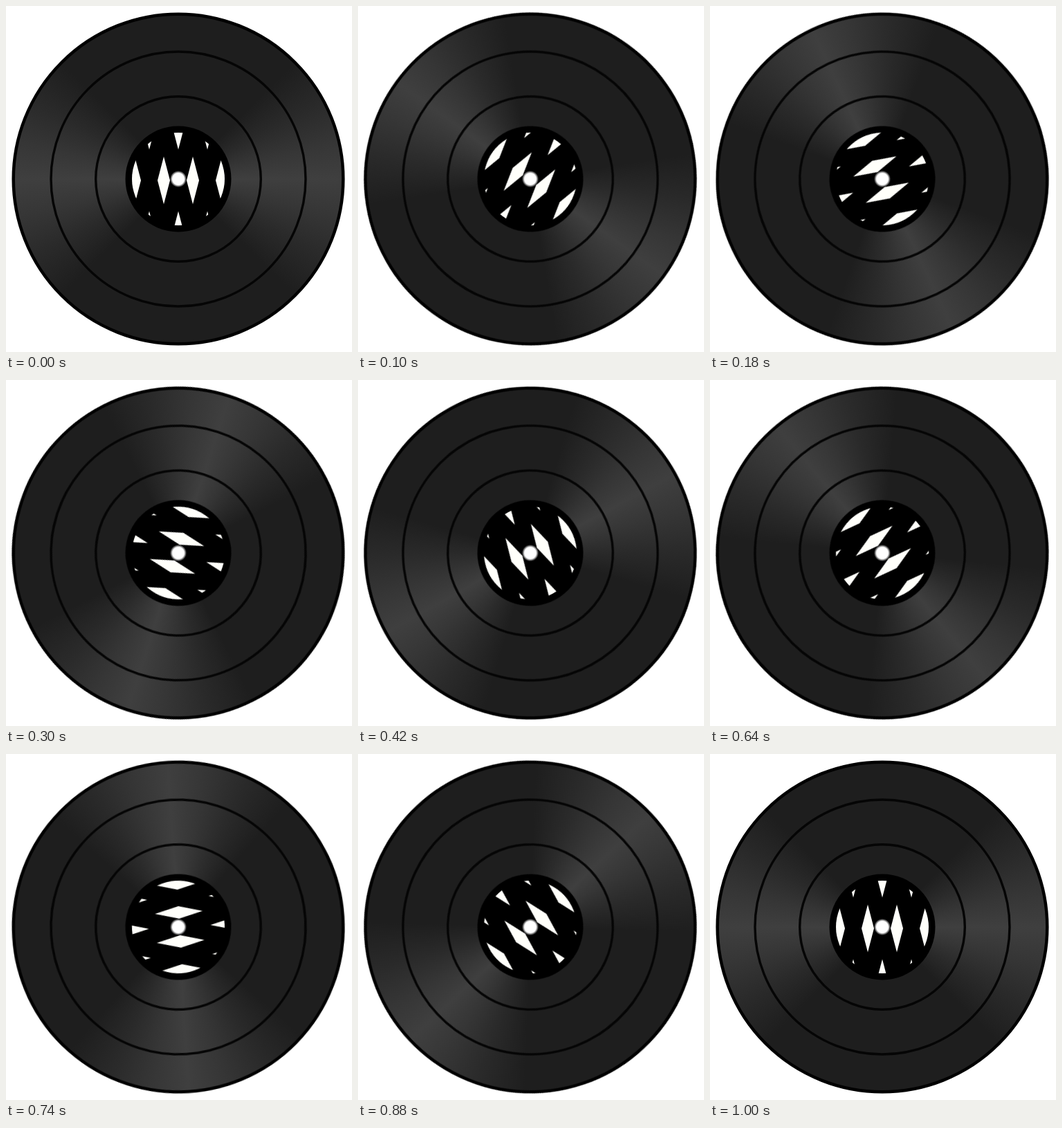
Write an HTML page that moves like this. It is 500x500 px and loops after 1020 ms.

```html
<!DOCTYPE html>
<html lang="en">
<head>
<meta charset="utf-8">
<title>Spinning record</title>
<style>
  html, body {
    margin: 0;
    width: 100%;
    height: 100%;
    overflow: hidden;
    background: #fff;
  }
  .stage {
    position: relative;
    width: 100%;
    height: 100%;
    overflow: clip;
    contain: paint;
  }
  .record {
    position: absolute;
    left: 9px;
    top: 10px;
    width: 480px;
    height: 480px;
    /* 51 poses, 7.2deg apart; the last one repeats the first */
    animation: spin 1020ms steps(51) infinite;
  }
  .sheen {
    position: absolute;
    inset: 2px;
    border-radius: 50%;
    background: repeating-conic-gradient(from 90deg,
      #3f3f3f 0deg, #363636 13deg, #2a2a2a 28deg, #1e1e1e 45deg,
      #1e1e1e 135deg, #2a2a2a 152deg, #363636 167deg, #3f3f3f 180deg);
  }
  svg {
    position: absolute;
    inset: 0;
    width: 100%;
    height: 100%;
    overflow: visible;
  }
  .groove {
    fill: none;
    stroke: #050505;
    stroke-width: 3.4;
  }
  .rim {
    fill: none;
    stroke: #000;
    stroke-width: 4.5;
  }
  @keyframes spin {
    to { transform: rotate(367.2deg); }
  }
</style>
</head>
<body>
<div class="stage">
  <div class="record">
    <div class="sheen"></div>
    <svg viewBox="-240 -240 480 480">
      <defs>
        <path id="gem" d="M0-34.5 9 0 0 34.5-9 0z"/>
        <g id="row">
          <use href="#gem" x="-42"/>
          <use href="#gem"/>
          <use href="#gem" x="42"/>
        </g>
        <clipPath id="disc"><circle r="67"/></clipPath>
        <radialGradient id="hole">
          <stop offset=".7" stop-color="#fff"/>
          <stop offset="1" stop-color="#000"/>
        </radialGradient>
      </defs>
      <circle class="rim" r="238.3"/>
      <circle class="groove" r="184"/>
      <circle class="groove" r="119.3"/>
      <circle r="76.5"/>
      <g clip-path="url(#disc)" fill="#fffffa">
        <use href="#row" y="-77"/>
        <use href="#row" x="-21" y="2"/>
        <use href="#gem" x="63" y="2"/>
        <use href="#row" y="81"/>
      </g>
      <circle r="12" fill="url(#hole)"/>
    </svg>
  </div>
</div>
</body>
</html>
```
